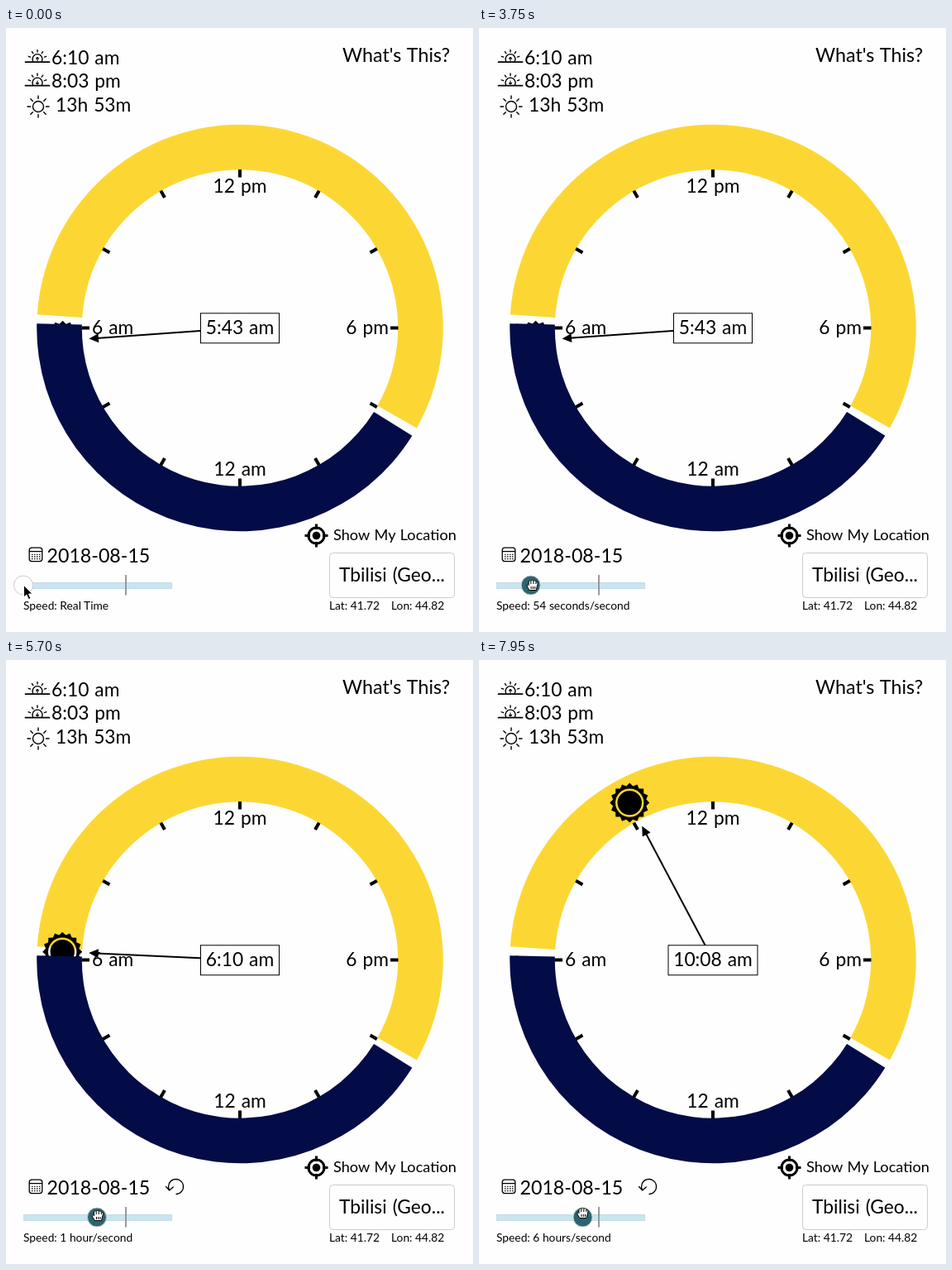
An HTML page that plays this animation: 565x730 px, repeating every 8000 ms.

```html
<!DOCTYPE html>
<html lang="en">
<head>
<meta charset="utf-8">
<title>Daylight clock</title>
<style>
  html, body { margin: 0; width: 100%; height: 100%; overflow: hidden; background: #fefefe; }
  svg { display: block; width: 565px; height: 730px; }
  text { font-family: Lato, "Open Sans", sans-serif; font-size: 22.8px; word-spacing: .05em; fill: #000; }
  .small { font-size: 13.8px; word-spacing: 0; }
  .mid { text-anchor: middle; }
  .line { fill: none; stroke: #000; stroke-linecap: round; stroke-linejoin: round; }
</style>
</head>
<body>
<svg viewBox="0 0 565 730">
  <rect width="565" height="730" fill="#fefefe"/>

  <g class="line" stroke-width="1.4">
    <g id="rise"></g>
    <g id="set" transform="translate(0 28.5)"></g>
    <circle cx="39" cy="95" r="6.5"/>
    <path id="rays"/>
  </g>
  <text x="55" y="44">6:10 am</text>
  <text x="55" y="72">8:03 pm</text>
  <text x="60" y="101">13h 53m</text>
  <text x="407" y="41" style="font-size:23.3px">What's This?</text>

  <path id="day" fill="#fcd734"/>
  <path id="sun" fill-rule="evenodd"/>
  <path id="night" fill="#030c47"/>
  <path id="ticks" stroke="#000" stroke-width="4"/>
  <text class="mid" x="283" y="199">12 pm</text>
  <text class="mid" x="283" y="541">12 am</text>
  <text x="104" y="370">6 am</text>
  <text x="463" y="370" text-anchor="end">6 pm</text>

  <g id="hand">
    <path d="M0 0V-174" stroke="#000" stroke-width="2"/>
    <path d="M0 -183L5.5 -171.5H-5.5Z"/>
  </g>
  <rect id="box" y="344.8" height="36" fill="#fefefe" stroke="#000"/>
  <text id="clock" class="mid" x="283" y="370"></text>

  <g class="line" stroke-width="1.3">
    <rect x="28.2" y="628.2" width="15.6" height="16.4" rx="3"/>
    <path d="M28.5 632.7H43.5"/>
    <path d="M31.5 636.3H41M31.5 639H41M31.5 641.7H41" stroke-dasharray=".5 2.5"/>
  </g>
  <text x="49.5" y="646" style="font-size:23.2px">2018-08-15</text>
  <path id="undo" class="line" stroke-width="1.3" d="M197.5 640.5A9 9 0 1 1 206 645.5M193.5 636.5L197.7 641L202.3 637"/>

  <rect x="21.5" y="670.5" width="179" height="7" fill="#c8e6f0" stroke="#c6dbe2"/>
  <path d="M145 661V685.5" stroke="#999" stroke-width="2"/>
  <circle id="knob" cy="673.5" r="11.5" stroke="#ccc"/>
  <text id="speed" class="small" x="21" y="703"></text>

  <g class="line" stroke-width="3" style="stroke-linecap:butt">
    <circle cx="375.5" cy="613.5" r="9.5"/>
    <path d="M375.5 599.5V606M375.5 621V627.5M361.5 613.5H368M383 613.5H389.5"/>
  </g>
  <circle cx="375.5" cy="613.5" r="4.8"/>
  <text x="396" y="619" style="font-size:18.2px">Show My Location</text>
  <rect x="391.5" y="634.5" width="151" height="54" rx="4" fill="#fefefe" stroke="#ccc"/>
  <text x="403" y="669">Tbilisi (Geo...</text>
  <text class="small" x="391" y="703">Lat: 41.72</text>
  <text class="small" x="466" y="703">Lon: 44.82</text>

  <path id="arrow" d="M0 0V14.5L3.4 11.5L5.8 17L8.4 16L6 10.5H10.5Z" stroke="#fff" transform="translate(21.5 673.5)"/>
  <g id="palm" fill="#fff" stroke="#000" stroke-linejoin="round">
    <path d="M-4 8L-8 1Q-8 -2 -5 0L-5 -5Q-4 -7.5 -2.5 -5L-2 -7Q0 -9 1 -7L1.5 -6Q3.5 -8 4.5 -5Q7.5 -6 7 -2L5 8Z"/>
    <path d="M-2 -5V-1M1.3 -6V-1M4.5 -5V-1" fill="none"/>
  </g>
  <g id="fist" fill="#fff" stroke="#000" stroke-linejoin="round">
    <path d="M-3.5 6.5L-6.5 2Q-7 -1 -4.5 -1.5V-4Q-3.5 -6 -1.8 -4.8Q0 -6.5 1.3 -4.8Q3.2 -6 4.3 -4Q6.5 -4.5 6.5 -1.5L4.5 6.5Z"/>
    <path d="M-4.5 -1.5V1M-1.8 -4.5V-1M1.3 -4.5V-1M4.3 -3.8V-1M-1.5 2V5M.8 2V5M3 2V5" fill="none"/>
  </g>
</svg>
<script>
  const LOOP = 8000, STEP = 150;
  const CX = 283, CY = 362.5, OUTER = 245.8, INNER = 191.2, ORBIT = 215;
  const TRACK_X = 21, GROWTH = 0.0958;

  // [ms, value]
  const MINUTES = [[0, 343.6], [2700, 343.7], [3750, 343.8], [4500, 345.4], [4650, 347.4],
    [5250, 357.5], [5700, 370.5], [6750, 424.5], [7050, 440.5], [7800, 584.2], [7950, 608.2]];
  const KNOB = [[2700, 21], [3600, 60], [3750, 62.65], [4500, 92.65], [5250, 94.5],
    [5700, 110], [6750, 110.5], [7050, 119], [7800, 120], [7950, 125.5]];
  const GRIP_X = [[750, -1], [1050, -3], [2700, -3], [3750, 2], [4500, 0], [5700, 1], [7050, 0]];
  const GRIP_Y = [[750, 4], [1050, 1], [2700, 1], [3750, 0], [4500, -2], [7050, -2], [7950, -5]];

  const $ = id => document.getElementById(id);
  const set = (id, attrs) => {
    for (const key in attrs) $(id).setAttribute(key, attrs[key]);
  };
  const show = (id, on) => set(id, { visibility: on ? "visible" : "hidden" });

  function track(keys, t) {
    if (t <= keys[0][0]) return keys[0][1];
    for (let i = 1; i < keys.length; i++) {
      const [t0, a] = keys[i - 1], [t1, b] = keys[i];
      if (t <= t1) return a + (b - a) * (t - t0) / (t1 - t0);
    }
    return keys[keys.length - 1][1];
  }

  // Angles run clockwise from the top, in degrees.
  function polar(r, deg, x = CX, y = CY) {
    const a = deg * Math.PI / 180;
    return [x + r * Math.sin(a), y - r * Math.cos(a)];
  }
  const dialAngle = minutes => (minutes - 720) / 4;

  function band(from, to) {
    const large = to - from > 180 ? 1 : 0;
    return `M${polar(OUTER, from)}A${OUTER} ${OUTER} 0 ${large} 1 ${polar(OUTER, to)}` +
      `L${polar(INNER, to)}A${INNER} ${INNER} 0 ${large} 0 ${polar(INNER, from)}Z`;
  }

  function spokes(count, start, step, r0, r1, x, y) {
    let d = "";
    for (let i = 0; i < count; i++) {
      const a = start + i * step;
      d += `M${polar(r0, a, x, y)}L${polar(r1, a, x, y)}`;
    }
    return d;
  }

  const disc = r => `M${-r} 0A${r} ${r} 0 1 1 ${r} 0A${r} ${r} 0 1 1 ${-r} 0Z`;

  function gear(teeth, tip, valley) {
    const points = [];
    for (let i = 0; i < teeth * 2; i++) {
      points.push(polar(i % 2 ? valley : tip, i * 180 / teeth, 0, 0));
    }
    return "M" + points.join("L") + "Z";
  }

  function horizon(id, head) {
    $(id).innerHTML =
      '<path d="M23.5 41.2H52.5" stroke-width="1.8"/><path d="M32.5 40A6 6 0 1 1 43.5 40"/>' +
      `<path d="${spokes(5, -72, 36, 8.8, 11.3, 38, 37.8)}"/>` +
      `<path d="M38 35.5V39.5M36.5 ${head[0]}L38 ${head[1]}L39.5 ${head[0]}" stroke-width="1.1"/>`;
  }

  const SUNRISE = dialAngle(370), SUNSET = dialAngle(1203), GAP = 1.27;
  horizon("rise", [37, 35.5]);
  horizon("set", [38, 39.5]);
  set("rays", { d: spokes(8, 0, 45, 9.5, 13, 39, 95) });
  set("day", { d: band(SUNRISE + GAP, SUNSET - GAP) });
  set("night", { d: band(SUNSET + GAP, SUNRISE + 360 - GAP) });
  set("ticks", { d: spokes(12, 0, 30, 182, INNER + 0.3) });
  set("sun", { d: gear(16, 24, 20.5) + disc(17.2) + disc(14.7) });

  function clockText(minutes) {
    const h = Math.floor(minutes / 60), m = Math.floor(minutes % 60);
    return `${h}:${String(m).padStart(2, "0")} am`;
  }

  function speedText(x) {
    const rate = Math.exp(GROWTH * (x - TRACK_X));
    if (rate < 1.5) return "Speed: Real Time";
    const [unit, size] = rate < 60 ? ["second", 1] : rate < 3600 ? ["minute", 60] : ["hour", 3600];
    const n = Math.round(rate / size);
    return `Speed: ${n} ${unit}${n === 1 ? "" : "s"}/second`;
  }

  function draw(ms) {
    const t = Math.floor(ms / STEP) * STEP;
    const minutes = track(MINUTES, t), x = track(KNOB, t);
    const angle = dialAngle(minutes), held = t >= 900;

    set("sun", { transform: `translate(${polar(ORBIT, angle)})` });
    set("hand", { transform: `translate(${CX} ${CY}) rotate(${angle})` });
    const width = minutes >= 600 ? 108 : 95;
    set("box", { x: 283 - width / 2, width });
    $("clock").textContent = clockText(minutes);

    set("knob", { cx: x, fill: held ? "#2b6570" : "#fefefe" });
    $("speed").textContent = speedText(x);
    show("undo", minutes >= 344);

    show("arrow", t < 150);
    show("palm", t >= 150 && !held);
    show("fist", held);
    const cx = x + track(GRIP_X, t), cy = 673 + track(GRIP_Y, t);
    set("palm", { transform: t < 750 ? "translate(22 681.5)" : `translate(${cx} ${cy})` });
    set("fist", { transform: `translate(${cx} ${cy})` });
  }

  const start = performance.now();
  function tick() {
    draw((performance.now() - start) % LOOP);
    requestAnimationFrame(tick);
  }
  tick();
</script>
</body>
</html>
```
